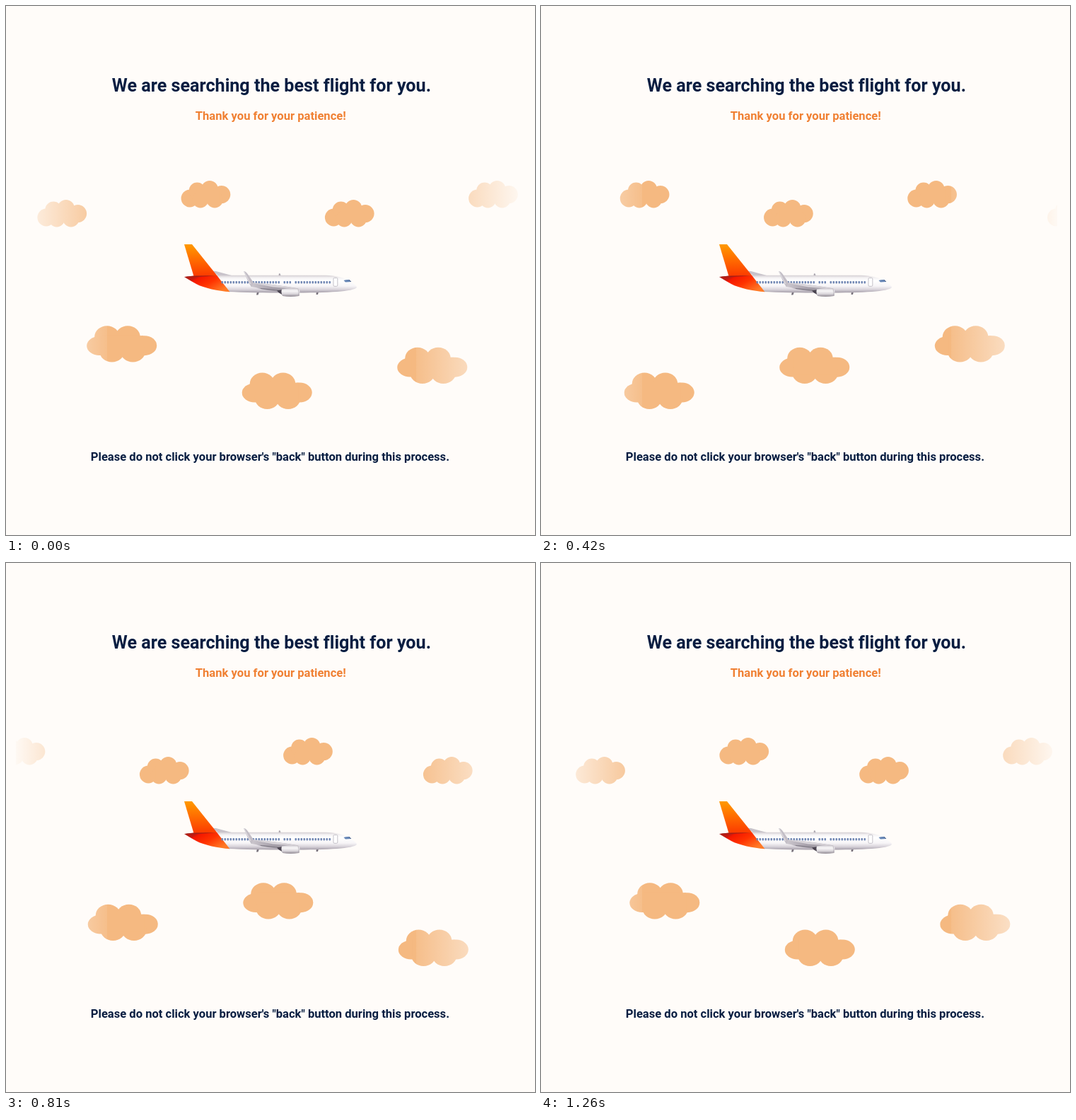
Write an HTML page that moves like this. It is 748x748 px and loops after 1290 ms.

```html
<!DOCTYPE html>
<html lang="en">
<head>
<meta charset="utf-8">
<title>Searching flights</title>
<style>
  html, body { margin: 0; width: 100%; height: 100%; overflow: hidden; background: #fffcf9; }
  svg { display: block; width: 100%; height: 100%; }
  text {
    font-family: Roboto, sans-serif; font-weight: 700; font-variant-ligatures: none;
    text-anchor: middle; fill: #071d41;
  }
</style>
</head>
<body>
<svg viewBox="0 0 748 748" xmlns="http://www.w3.org/2000/svg">
  <defs>
    <g id="small">
      <circle cx="12.3" cy="25.4" r="12.4"/>
      <circle cx="22.6" cy="14.8" r="11.8"/>
      <circle cx="40.3" cy="12.3" r="12"/>
      <circle cx="57" cy="20" r="12.6"/>
      <circle cx="27.2" cy="27.4" r="11.4"/>
      <circle cx="47.4" cy="27.2" r="11.6"/>
      <rect x="22" y="14" width="32" height="18"/>
    </g>
    <g id="big">
      <ellipse cx="18" cy="28.3" rx="18" ry="13.5"/>
      <ellipse cx="28.6" cy="15.6" rx="17.6" ry="15.6"/>
      <ellipse cx="58" cy="15.4" rx="17.4" ry="15.4"/>
      <ellipse cx="81.5" cy="28" rx="17.5" ry="14"/>
      <ellipse cx="35.6" cy="36" rx="17.5" ry="15.3"/>
      <ellipse cx="65.2" cy="36" rx="17.5" ry="15.3"/>
      <rect x="20" y="14" width="60" height="24"/>
    </g>
    <linearGradient id="fadeL">
      <stop offset="0" stop-color="#fffcf9"/>
      <stop offset="1" stop-color="#fffcf9" stop-opacity=".08"/>
    </linearGradient>
    <linearGradient id="fadeR">
      <stop offset="0" stop-color="#fffcf9" stop-opacity=".08"/>
      <stop offset="1" stop-color="#fffcf9"/>
    </linearGradient>
    <linearGradient id="hull" x1="0" y1="0" x2="0" y2="1">
      <stop offset="0" stop-color="#d3ced2"/>
      <stop offset=".14" stop-color="#f4f2f3"/>
      <stop offset=".3" stop-color="#fff"/>
      <stop offset=".62" stop-color="#f7f5f7"/>
      <stop offset=".82" stop-color="#d8d3da"/>
      <stop offset="1" stop-color="#a49da8"/>
    </linearGradient>
    <linearGradient id="fin" x1="0" y1="0" x2="0" y2="1">
      <stop offset="0" stop-color="#ff9a00"/>
      <stop offset=".5" stop-color="#ff6a00"/>
      <stop offset="1" stop-color="#fb3a00"/>
    </linearGradient>
    <linearGradient id="tail" x1="0" y1="0" x2="1" y2=".6">
      <stop offset="0" stop-color="#a3221c"/>
      <stop offset=".22" stop-color="#c41a10"/>
      <stop offset=".3" stop-color="#f51800"/>
      <stop offset=".6" stop-color="#ff3300"/>
      <stop offset="1" stop-color="#ff7a26"/>
    </linearGradient>
    <linearGradient id="pod" x1="0" y1="0" x2="0" y2="1">
      <stop offset="0" stop-color="#d5d1d7"/>
      <stop offset=".3" stop-color="#f8f7f8"/>
      <stop offset=".65" stop-color="#dcd8dd"/>
      <stop offset="1" stop-color="#8e8790"/>
    </linearGradient>
    <linearGradient id="wing" x1="0" y1="0" x2="1" y2="0">
      <stop offset="0" stop-color="#cdc8cf"/>
      <stop offset=".5" stop-color="#a49ea8"/>
      <stop offset="1" stop-color="#bdb8bf"/>
    </linearGradient>
    <clipPath id="sky"><rect x="14" y="230" width="716" height="360"/></clipPath>
  </defs>

  <rect width="748" height="748" fill="#fffcf9"/>
  <text x="375.4" y="121" font-size="25.13">We are searching the best flight for you.</text>
  <text x="374.3" y="161" font-size="16.6" style="fill:#f08033">Thank you for your patience!</text>
  <text x="373.4" y="643" font-size="16.57">Please do not click your browser's "back" button during this process.</text>

  <g clip-path="url(#sky)">
    <g id="clouds" fill="#f5b981"></g>
    <rect x="7" y="230" width="136" height="360" fill="url(#fadeL)"/>
    <rect x="580" y="230" width="158" height="360" fill="url(#fadeR)"/>
  </g>

  <g id="plane">
    <path d="M290 374.5L297 375L319 381H300Z" fill="#c8c3ca"/>
    <path d="M385.500 381L386 378.300H387.500L388.500 381Z" fill="#aaa5ad"/>
    <path d="M355 404L354 408.500H356.500L358 404ZM439 404L438.500 408H441L442 404Z" fill="#77717b"/>
    <path d="M296 380.700H452C466 381 478 384 486 389C492 393 496 396 496 398C494 401 483 402.700 468 404C452 405 430 405.500 400 405.500C365 405.500 335 405 314 404Z" fill="url(#hull)"/>
    <path d="M252 383L266 381.500H298.500L316.500 404.300C300 403 280 399 269 393Q260 388 252 383Z" fill="url(#tail)"/>
    <path d="M252 337H263L299 382H265.500Z" fill="url(#fin)"/>
    <path d="M252 382.800Q272 380.800 298 381.600L268 383Z" fill="#a02018"/>
    <g id="windows" fill="#7288b4"></g>
    <rect x="463" y="384.500" width="5.800" height="11.800" rx="1.300" fill="#fff" stroke="#b7b3bb" stroke-width=".8"/>
    <path d="M477.500 388Q482 386.500 485 387L488 390L480 390.500Z" fill="#6585b5"/>
    <path d="M485 387L488 390" stroke="#3d5275" stroke-width=".8"/>
    <path d="M346 391Q376 393 414 399.500L402 403H382Q366 400 347 397Z" fill="url(#wing)"/>
    <path d="M347 391.500Q378 393 412 399.500L378 397.500Z" fill="#d9d5da"/>
    <path d="M354 398.500L390 400.500L387 404Q369 402 354 398.500Z" fill="#a29ca6"/>
    <path d="M360 399.500L388 402.500" stroke="#77717d" stroke-width=".8"/>
    <path d="M336 375Q339 375 341 378L350 391L347 397.500L342.500 390Z" fill="#c3bec6"/>
    <path d="M336.500 375.500L346 393" stroke="#e6e3e7" stroke-width="1"/>
    <path d="M383 402.500L391 401V408.500L386 405.500Z" fill="#4a4450"/>
    <path d="M390 400.500Q402 398.500 414 400Q416.500 405 414.500 410Q402 412 391 410Q388.500 405 390 400.500Z" fill="url(#pod)"/>
    <path d="M413 400.300Q415 405 413.300 410" fill="none" stroke="#aaa4ad" stroke-width=".7"/>
  </g>
</svg>
<script>
const NS = 'http://www.w3.org/2000/svg';
const STEP = 30, STEPS = 43;
const clouds = [];

// [step, distance travelled to the left]
const smallPath = [[0, 0], [33, 320.2], [42, 401.7], [43, 406.7]];
const bigPath = [[0, 0], [6, 97], [14, 216], [19, 303], [27, 437.5], [33, 529], [42, 647.5], [43, 658.6]];

function add(parent, tag, attrs) {
  const el = document.createElementNS(NS, tag);
  for (const key in attrs) el.setAttribute(key, attrs[key]);
  return document.getElementById(parent).appendChild(el);
}

function addCloud(kind, x, y, path) {
  clouds.push({ el: add('clouds', 'use', { href: '#' + kind }), x, y, path });
}

[44.5, 247.7, 451, 654.2, 852, 1055].forEach((x, i) =>
  addCloud('small', x, i % 2 ? 246.6 : 273.6, smallPath));

const rows = [452.2, 518.6, 482.7];
for (let i = 0; i < 6; i++) addCloud('big', 114.2 + 219.53 * i, rows[i % 3], bigPath);

for (let x = 304.5; x < 460; x += 4) {
  if ((x > 388 && x < 391) || (x > 403 && x < 407)) continue;
  add('windows', 'rect', { x, y: 389, width: 2.5, height: 3.4, rx: 0.8 });
}

function travel(path, k) {
  const i = path.findIndex(p => p[0] > k);
  const [k0, d0] = path[i - 1], [k1, d1] = path[i];
  return d0 + (d1 - d0) * (k - k0) / (k1 - k0);
}

function draw(ms) {
  const k = Math.floor(ms / STEP) % STEPS;
  for (const c of clouds) {
    const x = c.x - travel(c.path, k);
    c.el.setAttribute('transform', `translate(${x.toFixed(2)} ${c.y})`);
  }
}

let start;
function tick(now) {
  if (start === undefined) start = now;
  draw(Math.max(0, now - start));
  requestAnimationFrame(tick);
}
draw(0);
requestAnimationFrame(tick);
</script>
</body>
</html>
```
